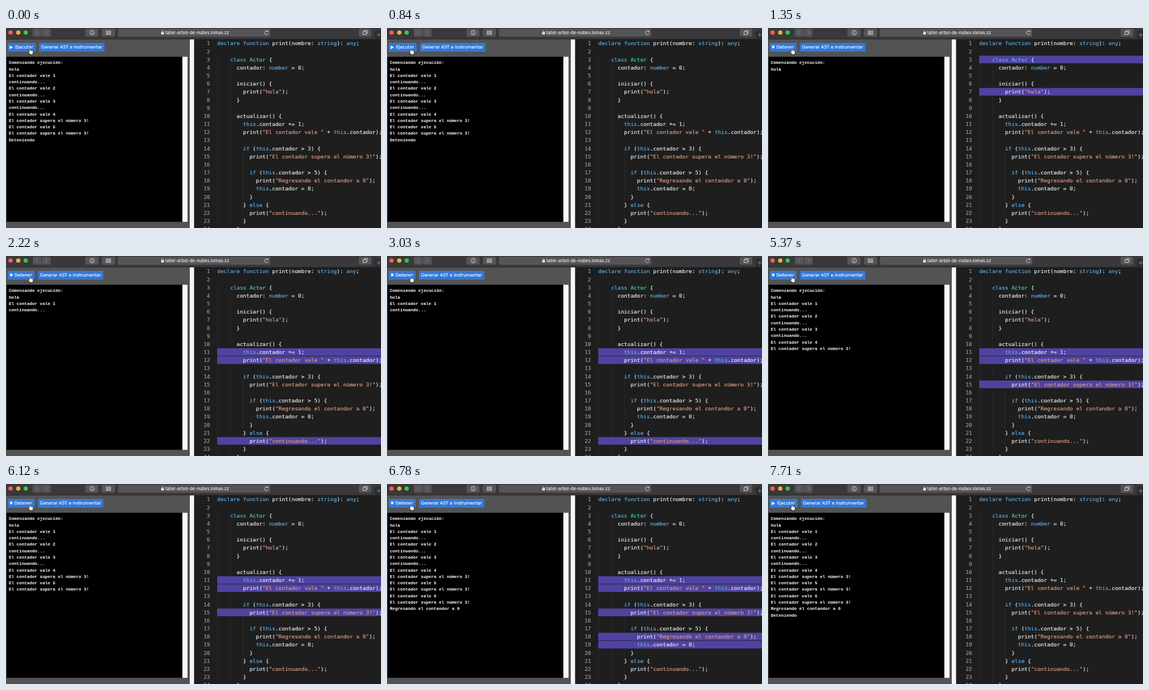
Recreate the animation shown at these times as an HTML page. Size 657 by 351 pixels, loop 7740 ms.

```html
<!DOCTYPE html>
<html lang="es">
<head>
<meta charset="utf-8">
<title>Editor</title>
<style>
  html, body { margin: 0; width: 100%; height: 100%; overflow: hidden; background: #1e1e1e; }
  svg { display: block; width: 657px; height: 351px; }
  text { white-space: pre; }
  .code { font: 9.41px "DejaVu Sans Mono", monospace; fill: #ececec; stroke: #ececec; stroke-width: 0.2; }
  .number { fill: #999; stroke: #999; text-anchor: end; }
  .keyword { fill: #5fabe4; stroke: #5fabe4; }
  .type { fill: #42d3b9; stroke: #42d3b9; }
  .string { fill: #dc9c82; stroke: #dc9c82; }
  .digit { fill: #dce8d2; stroke: #dce8d2; }
  .console { font: bold 7.55px "Liberation Mono", monospace; fill: #fff; }
  .button { font: 7.6px "DejaVu Sans", sans-serif; fill: #fff; stroke: #fff; stroke-width: 0.15; }
  .address { font: 500 7.5px Inter, sans-serif; fill: #f0f0f0; }
  .icon { fill: none; stroke: #dedede; stroke-width: 0.9; }
</style>
</head>
<body>
<svg id="stage" viewBox="0 0 657 351">
  <rect width="657" height="351" fill="#1e1e1e"/>
  <g id="guides" fill="#333"></g>
  <g id="marks" fill="#4f43a0"></g>
  <g id="code"></g>

  <rect y="20" width="322" height="331" fill="#535353"/>
  <rect x="322" y="20" width="7.5" height="331" fill="#f7f7f7"/>
  <rect x="1" y="50.5" width="308" height="289.7" fill="#000"/>
  <rect x="309" y="50.5" width="9" height="289.7" fill="#fafafa"/>
  <g id="console"></g>
  <g id="buttons"></g>

  <rect width="657" height="20" fill="#39383a"/>
  <rect y="19" width="657" height="1" fill="#2b2a2c"/>
  <circle cx="8" cy="8" r="3.8" fill="#fc5b57"/>
  <circle cx="21.5" cy="8" r="3.8" fill="#e8b33c"/>
  <circle cx="34.5" cy="8" r="3.8" fill="#35c649"/>
  <g fill="#555456">
    <rect x="47" y="1.2" width="15.2" height="14" rx="2.5"/>
    <rect x="63" y="1.2" width="15.2" height="14" rx="2.5"/>
    <rect x="139" y="1.2" width="23" height="14" rx="2.5"/>
    <rect x="168" y="1.2" width="23" height="14" rx="2.5"/>
    <rect x="196" y="1.2" width="267" height="14" rx="2.5"/>
    <rect x="618" y="1.2" width="22" height="14" rx="2.5"/>
    <rect x="646" y="5" width="11" height="14.5" fill="#2d2c2e"/>
  </g>
  <g class="icon">
    <path d="M56 5l-3 3.2 3 3.2M69.500 5l3 3.200-3 3.200" stroke="#8b8a8c"/>
    <circle cx="151" cy="8.200" r="4"/>
    <path d="M151 7.500v3M151 5.500v1" stroke-width="1.2"/>
    <path d="M175 5.700h9M175 8.300h9M175 10.900h9" stroke-width="1.7" stroke-dasharray="1.7 0.7"/>
    <path d="M458.600 6.200a3.300 3.300 0 1 0 .5 3.200M459 4v2.600h-2.600"/>
    <rect x="625.500" y="6.500" width="5.500" height="5"/>
    <path d="M627.500 6v-1.500h5.700v5.200h-2"/>
    <path d="M649.500 12h7M653 8.500v7" stroke="#8f8f8f"/>
    <path d="M273 7.500v-1.300a1.300 1.300 0 0 1 2.600 0v1.300"/>
  </g>
  <rect x="271.800" y="7.300" width="5" height="4" rx="0.6" fill="#e8e8e8"/>
  <text class="address" x="279" y="11">taller-arbol-de-nubes.lomas.zz</text>

  <path transform="translate(43.300 41.200) scale(1.15) translate(-43.300 -41.800)"
        d="M41.300 41.500V37.800q0-1 .9-1t.9 1v2.400q.7-.4 1.300.2.700-.4 1.200.2 1.300-.2 1.300 1v2.200q0 1-.7 1.800v.9h-4.200v-.8l-2.300-3q-.5-1 .4-1.200.7 0 1.200.7z"
        fill="#fff" stroke="#111" stroke-width="0.7" stroke-linejoin="round"/>
</svg>

<script>
const LOOP = 7740, START = 1290, TICK = 890, STOP = 7140;
const ROW = 14.17, CHAR = 5.665, CODE_X = 370;

const source = `declare function print(nombre: string): any;

    class Actor {
      contador: number = 0;

      iniciar() {
        print("hola");
      }

      actualizar() {
        this.contador += 1;
        print("El contador vale " + this.contador);

        if (this.contador > 3) {
          print("El contador supera el número 3!");

          if (this.contador > 5) {
            print("Regresando el contandor a 0");
            this.contador = 0;
          }
        } else {
          print("continuando...");
        }
      }`.split("\n");

const layer = id => document.getElementById(id);
const escapeText = s => s.replace(/&/g, "&amp;").replace(/</g, "&lt;").replace(/>/g, "&gt;");
const rect = (x, y, w, h, extra = "") => `<rect x="${x}" y="${y}" width="${w}" height="${h}" ${extra}/>`;
const text = (style, x, y, content) => `<text class="${style}" x="${x}" y="${y}">${content}</text>`;

const tokens = /("[^"]*")|\b(declare|function|class|this|if|else|string|number|any)\b|\b([A-Z]\w*)|\b(\d+)\b|[^"\w]+|\w+/g;

function colour(line) {
  return line.replace(tokens, (all, string, keyword, type, digit) => {
    const style = string ? "string" : keyword ? "keyword" : type ? "type" : digit ? "digit" : "";
    return style ? `<tspan class="${style}">${escapeText(all)}</tspan>` : escapeText(all);
  });
}

function drawCode() {
  let rows = "", guides = "", indent = 0;
  source.forEach((line, i) => {
    const y = 30.4 + i * ROW;
    const body = line.trimStart();
    if (body) indent = line.length - body.length;
    rows += text("code number", 357.5, y, i + 1);
    if (body) rows += text("code", CODE_X + indent * CHAR, y, colour(body));
    for (let column = 0; column < indent; column += 4)
      guides += rect(CODE_X + column * CHAR, 20 + i * ROW, 0.7, ROW);
  });
  layer("code").innerHTML = rows;
  layer("guides").innerHTML = guides;
}

function logLines(ticks, stopped) {
  const lines = ["Comenzando ejecución:", "hola"];
  for (let n = 1; n <= ticks; n++) {
    lines.push("El contador vale " + n);
    lines.push(n > 3 ? "El contador supera el número 3!" : "continuando...");
    if (n > 5) lines.push("Regresando el contandor a 0");
  }
  if (stopped) lines.push("Deteniendo");
  return lines;
}

function markedLines(ticks) {
  if (!ticks) return [3, 7];
  return [11, 12, ticks > 3 ? 15 : 22, ...(ticks > 5 ? [18, 19] : [])];
}

const button = (x, width, label, textX) =>
  rect(x, 26, width, 15.5, 'rx="1.5" fill="#3478d6"') + text("button", textX, 36.4, label);

function drawState(ticks, running) {
  layer("console").innerHTML = logLines(ticks, !running)
    .map((line, i) => text("console", 5, 63.3 + i * 11.29, line)).join("");
  layer("marks").innerHTML = running
    ? markedLines(ticks).map(n => rect(CODE_X, 20.2 + (n - 1) * ROW, 287, 13.4)).join("") : "";
  layer("buttons").innerHTML = running
    ? button(3, 47, "✖ Detener", 6) + button(56, 114.5, "Generar AST e instrumentar", 59.5)
    : button(3, 49, "▶", 6.5) + text("button", 16, 36.4, "Ejecutar")
      + button(58, 114.5, "Generar AST e instrumentar", 61.5);
}

let shown = "";
function frame(now) {
  const t = now % LOOP;
  const running = t >= START && t < STOP;
  const ticks = t < START ? 5 : Math.min(6, Math.floor((t - START) / TICK));
  const key = ticks + "," + running;
  if (key !== shown) {
    shown = key;
    drawState(ticks, running);
  }
  requestAnimationFrame(frame);
}

drawCode();
frame(0);
</script>
</body>
</html>
```
